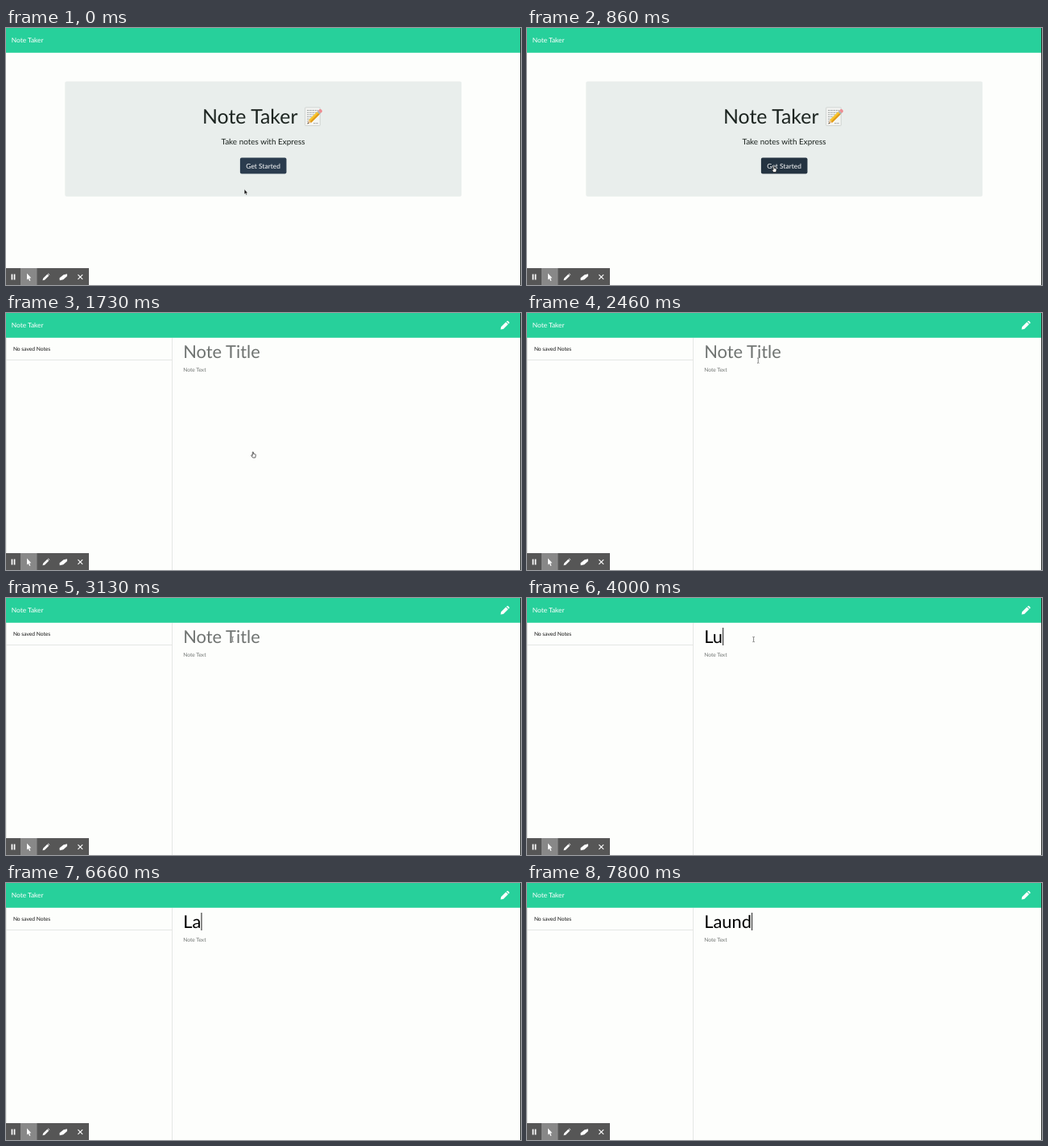
Animation, 640 px wide and 320 px high, one loop 8 s. Source, as an HTML page:

```html
<!DOCTYPE html>
<html lang="en">
<head>
<meta charset="utf-8">
<title>Note Taker</title>
<style>
  html, body { margin: 0; width: 100%; height: 100%; overflow: hidden; background: #fdfefc; }
  svg { display: block; width: 640px; height: 320px; }
  text { font-family: Lato, sans-serif; font-weight: 400; text-rendering: geometricPrecision; }
  .mid { text-anchor: middle; }
  .line { stroke: #dfe1df; stroke-width: .8; }
</style>
</head>
<body>
<svg viewBox="0 0 640 320">
  <rect width="640" height="30.8" fill="#27d09b"/>
  <text x="6.8" y="18.4" font-size="8.33" fill="#fff">Note Taker</text>

  <g id="home">
    <rect x="73.3" y="66.6" width="492.8" height="143.2" rx="2" fill="#e9eeec"/>
    <text x="244" y="119.2" font-size="24.9" fill="#1c2420">Note Taker</text>
    <g id="memo">
      <rect x="371.7" y="99" width="18.6" height="22.6" rx=".8" fill="#f4f5f3" stroke="#c4c9c6" stroke-width=".7"/>
      <path d="M374 102.5H388M374 105.2H387M374 107.9H386M374 110.6H383M374 113.3H380M374 116H377M382 118.7H388" stroke="#8d9492" stroke-width=".8" stroke-dasharray="2.6 .6"/>
      <path d="M374.5 119.4L376.3 114.6L379.4 117.7Z" fill="#e8c190"/>
      <path d="M374.5 119.4L375.2 117.6L376.4 118.7Z" fill="#333"/>
      <path d="M376.3 114.6L386.6 104.3L389.7 107.4L379.4 117.7Z" fill="#f8c52c"/>
      <path d="M378 116.3L388.3 106L389.7 107.4L379.4 117.7Z" fill="#e09a1c"/>
      <path d="M386.6 104.3L388.1 102.8L391.2 105.9L389.7 107.4Z" fill="#a9b0b2"/>
      <path d="M388.1 102.8L389.6 101.3Q391 100.6 392.3 101.9Q393.6 103.2 392.7 104.4L391.2 105.9Z" fill="#ee8d92"/>
    </g>
    <text class="mid" x="319.5" y="144.8" font-size="9.95" fill="#1c2420">Take notes with Express</text>
    <rect id="ring" x="290.1" y="160.6" width="59.2" height="21.8" rx="2.6" fill="#8b979e"/>
    <rect id="button" x="290.9" y="161.4" width="57.6" height="20.2" rx="2"/>
    <text class="mid" x="319.6" y="174.5" font-size="8.45" fill="#fff">Get Started</text>
  </g>

  <g id="notes">
    <path class="line" d="M.4 31V320M206.5 31V320M0 58.5H206.5"/>
    <text x="8.9" y="47.3" font-size="6.67" fill="#111">No saved Notes</text>
    <text id="title" x="220.2" y="56" font-size="21.9"/>
    <rect id="caret" y="37" width=".9" height="22"/>
    <text x="220.2" y="73.2" font-size="6.67" fill="#6f7371">Note Text</text>
    <path d="M614.6 20.6L615.2 17.3L621.2 11.3L624 14.1L618 20.1ZM621.9 10.6L622.6 9.9Q623.3 9.4 624 10L625.4 11.4Q625.9 12.1 625.4 12.7L624.7 13.4Z" fill="#fff"/>
  </g>

  <path d="M639.5 0V320" stroke="#2b2f2d" stroke-width="1"/>

  <g id="toolbar" fill="#fff">
    <rect y="299" width="103" height="21" fill="#565656"/>
    <rect x="18" y="299" width="20.5" height="21" fill="#888"/>
    <path d="M6.6 306.5h1.7v7h-1.7zM9.7 306.5h1.7v7h-1.7z"/>
    <path d="M26 305.5V313.6L27.8 312L29.2 315L30.4 314.4L29.1 311.6L31.3 311.3Z"/>
    <path d="M45.5 314.3L46.1 311.8L51.4 306.5L53.3 308.4L48 313.7ZM52 305.9L52.6 305.4L54.4 307.2L53.9 307.8Z"/>
    <path d="M66.5 311.2L71.5 307.2L76 306.2V309L71.2 313.2L66.7 314.3Z"/>
    <path d="M89.4 307.1L95.2 312.9M95.2 307.1L89.4 312.9" stroke="#fff" stroke-width="1.1"/>
  </g>

  <g id="pointer">
    <path id="arrow" d="M0 0V6.2L1.4 5L2.3 7.1L3.3 6.7L2.4 4.6H4.2Z" fill="#111" stroke="#fff" stroke-width=".4"/>
    <path id="hand" d="M-1.2 1V-3.2Q-.7 -4 0 -3.2V-1.1L2.4 -.6Q3 -.3 2.9 .7L2.3 3.6H-.9L-2.7 .9Q-2.6 0 -1.9 .3Z" fill="#fff" stroke="#222" stroke-width=".7"/>
    <path id="beam" d="M-1.2 -3.2Q0 -3.2 0 -2.4Q0 -3.2 1.2 -3.2M0 -2.4V2.4M-1.2 3.2Q0 3.2 0 2.4Q0 3.2 1.2 3.2" fill="none" stroke="#555" stroke-width=".7"/>
  </g>
</svg>
<script>
const LOOP = 8000, OPEN = 1730, HOVER = 800, PRESS = 1530;
const $ = id => document.getElementById(id);
const show = (id, on) => $(id).style.display = on ? '' : 'none';

// [time, value]: each value holds until the next
const typing = [
  [0, ''], [3730, 'L'], [4000, 'Lu'], [4130, 'Lua'], [4330, 'Luan'], [4530, 'Luand'], [4730, 'Luandr'],
  [5730, 'Luand'], [5860, 'Luan'], [6000, 'Lua'], [6130, 'Lu'], [6260, 'L'],
  [6660, 'La'], [6860, 'Lau'], [7060, 'Laun'], [7200, 'Laund']
];
const blink = [
  [0, false], [2660, true], [3130, false], [3600, true],
  [5260, false], [5800, true], [7200, false], [7530, true]
];
// [time, x, y]: eased from one to the next
const route = [
  [60, 296.2, 200.8], [950, 307.5, 175.2], [OPEN, 307.5, 176.5], [1780, 307.5, 176.5],
  [2270, 289, 61.5], [2380, 289, 61.5], [2640, 281.6, 51.5]
];

const held = (list, t) => list.filter(([at]) => at <= t).pop()[1];

function along(list, t) {
  const i = list.findIndex(([at]) => at > t);
  if (i < 0) return list[list.length - 1].slice(1);
  if (i === 0) return list[0].slice(1);
  const [a, b] = [list[i - 1], list[i]];
  const u = (t - a[0]) / (b[0] - a[0]), k = u * u * (3 - 2 * u);
  return [1, 2].map(j => a[j] + (b[j] - a[j]) * k);
}

function mix(from, to, u) {
  const k = Math.min(1, Math.max(0, u));
  return `rgb(${from.map((c, i) => Math.round(c + (to[i] - c) * k))})`;
}

function draw() {
  const t = performance.now() % LOOP;
  show('home', t < OPEN);
  show('notes', t >= OPEN);
  show('ring', t >= PRESS);
  $('button').setAttribute('fill', mix([43, 60, 78], [26, 37, 47], (t - HOVER) / 150));

  const typed = held(typing, t), title = $('title');
  title.textContent = typed || 'Note Title';
  title.setAttribute('fill', typed ? '#000' : '#6f7371');
  const width = typed ? title.getComputedTextLength() : 0;
  $('caret').setAttribute('x', 220.4 + width);
  show('caret', held(blink, t));

  $('pointer').setAttribute('transform', `translate(${along(route, t)})`);
  show('arrow', t < HOVER);
  show('hand', t >= HOVER && t < 1800);
  show('beam', t >= 1800 && t < 4600);
  requestAnimationFrame(draw);
}
draw();
</script>
</body>
</html>
```
